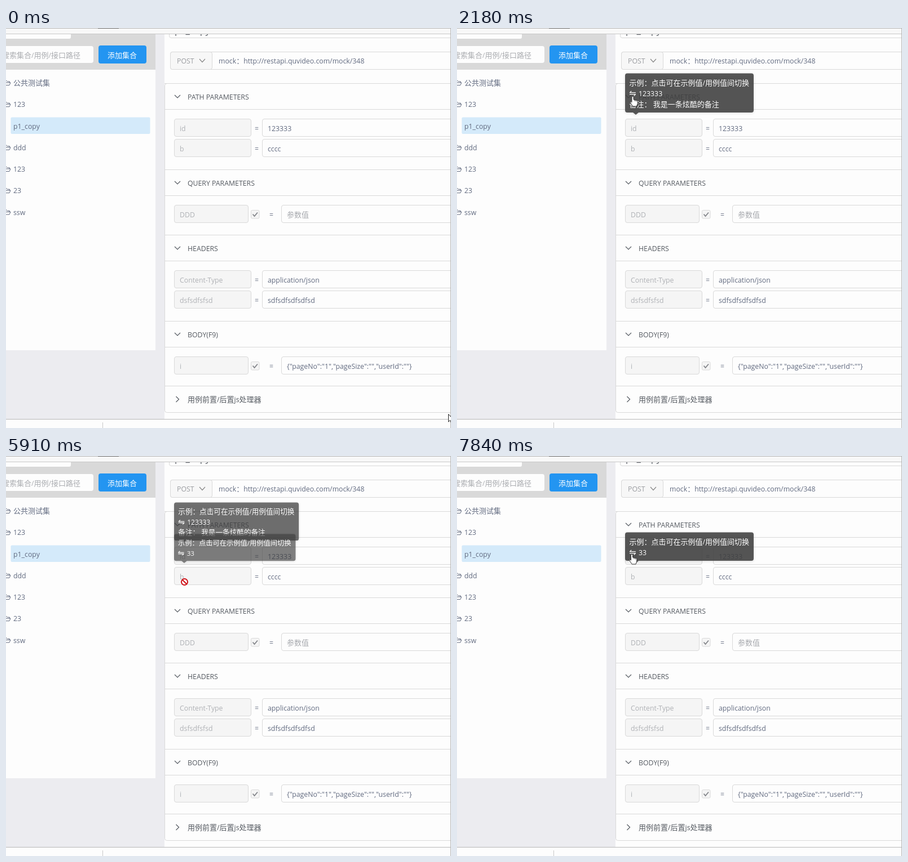
Recreate the animation shown at these times as an HTML page. Size 789 by 710 pixels, loop 8 s.

```html
<!DOCTYPE html>
<html lang="zh-CN">
<head>
<meta charset="utf-8">
<title>API test case editor</title>
<style>
  html, body { margin: 0; width: 100%; height: 100%; overflow: hidden; background: #fdfdfd; }
  svg { display: block; }
  text { font: 12.3px "Open Sans", "Noto Sans", sans-serif; white-space: pre; }
  .cjk { font: 13px "Noto Sans CJK SC", "Noto Sans CJK", "DejaVu Sans", sans-serif; }
  .tip { filter: drop-shadow(0 1px 2px rgba(0, 0, 0, .15)); }
</style>
</head>
<body>
<svg id="stage" width="789" height="710" viewBox="0 0 789 710"></svg>
<script>
const LOOP = 8000;
const INK = '#626b80', HEAD = '#555a61', DIM = '#b0b2b6', LINE = '#d9d9d9', PAPER = '#fdfdfd';
const COLON = '\uff1a'; // full-width
const stage = document.getElementById('stage');

const rect = (x, y, w, h, fill, r = 0, stroke = 'none') =>
  `<rect x="${x}" y="${y}" width="${w}" height="${h}" rx="${r}" fill="${fill}" stroke="${stroke}"/>`;
const path = (d, stroke, width = 1, fill = 'none') =>
  `<path d="${d}" stroke="${stroke}" stroke-width="${width}" fill="${fill}"/>`;
const runs = s => s.replace(/[^\x00-\x7f]+/g, m => `<tspan class="cjk">${m}</tspan>`);
// y is the middle of the line of text
const text = (x, y, s, fill = INK, attrs = '') =>
  `<text x="${x}" y="${y + 4.6}" fill="${fill}" ${attrs}>${runs(s)}</text>`;
const box = (x, y, w, fill = PAPER, h = 31) => rect(x + .5, y + .5, w, h, fill, 3.5, LINE);

function sidebar() {
  let out = rect(0, 10, 281, 684, '#ececf0') + rect(0, 10, 265, 64, LINE) +
    rect(-5, 5, 120, 14, PAPER, 3) + rect(0, 74, 265, 498, PAPER) +
    rect(-5, 32, 160, 30, PAPER, 4) + text(-7, 48, '搜索集合/用例/接口路径', '#aaacb0') +
    rect(164, 31, 85, 32, '#2395f1', 4) + text(180, 48, '添加集合', '#fff') +
    rect(8.5, 158.5, 247, 29.5, '#d4eafa', 2);
  ['公共测试集', '123', 'p1_copy', 'ddd', '123', '23', 'ssw'].forEach((name, i) => {
    const y = 97.5 + i * 38.25;
    out += text(13, y, name);
    if (i !== 2)
      out += path(`M-3 ${y + 4}v-8h4l1.5 1.5h4v2M-3 ${y + 4}l2-4.5h9l-2 4.5z`, INK);
  });
  return out;
}

function section(y, title, open = true) {
  const arrow = open ? `M299 ${y + 21}l5 5 5-5` : `M301.5 ${y + 19}l5 5-5 5`;
  const foot = open ? path(`M281 ${y + 46.5}H789`, LINE) : '';
  return path(`M281 ${y + .5}H789`, LINE) + foot + path(arrow, HEAD, 1.2) + text(322, y + 24, title, HEAD);
}

function field(y, name, value, check = false, color = INK, id = '') {
  const x = check ? 488 : 454;
  let out = box(298, y, check ? 131 : 136, '#f5f5f5') + text(308, y + 17, name, DIM) +
    text(check ? 467 : 441, y + 17, '=') + box(x, y, 400) +
    text(x + 10, y + 17, value, color, id && `id="${id}"`);
  if (check)
    out += rect(434.5, y + 9.5, 14.5, 14.5, '#f5f5f5', 2, LINE) +
      path(`M437.5 ${y + 16.5}l3 3.5 5.5-6.5`, '#85878c', 1.8);
  return out;
}

function editor() {
  return rect(281, 10, 508, 684, PAPER) +
    `<svg x="0" y="11" width="789" height="30" viewBox="0 11 789 30">${box(289, -14, 560) +
      text(299, 5.5, 'p1_copy', HEAD, 'style="font-size:16.5px"')}</svg>` +
    box(291, 42, 600) + box(291, 42, 74, '#f7f7f7') +
    text(303, 58.5, 'POST', '#9a9ca0') + path('M343 55l5 5.5 5-5.5', '#888', 1.2) +
    text(377, 58.5, `mock${COLON}http://restapi.quvideo.com/mock/348`) +
    rect(281.5, 98.5, 600, 584, PAPER, 4, LINE) +
    section(98, 'PATH PARAMETERS') +
    field(161, 'id', '123333', false, INK, 'idValue') + field(197, 'b', 'cccc', false, INK, 'bValue') +
    section(251, 'QUERY PARAMETERS') + field(314, 'DDD', '参数值', true, '#a6a8ad') +
    section(367, 'HEADERS') + field(430, 'Content-Type', 'application/json') +
    field(466, 'dsfsdfsfsd', 'sdfsdfsdfsdfsd') +
    section(520, 'BODY(F9)') + field(583, 'i', '{"pageNo":"1","pageSize":"","userId":""}', true) +
    section(635, '用例前置/后置js处理器', false);
}

const chrome = () =>
  rect(0, 0, 789, 10, '#f8f8f8') + path('M0 .5H789', '#b5b5b5') + path('M163 .5H200', '#666') +
  path('M0 10.5H789', '#c8c8c8') + rect(0, 694, 789, 16, PAPER) +
  path('M0 694.5H789', '#b8b8b8') + path('M171.5 700V710', '#c8c8c8') + path('M788.5 0V710', '#b5b5b5');

// Tooltip drawn upwards from its lower left corner, arrow included
function tooltip(id, y, lines) {
  const h = 12 + lines.length * 19.2, top = -4 - h;
  const rows = lines.map((s, i) => {
    const mid = top + 16.5 + i * 19;
    return i === 1
      ? `<text x="7" y="${mid + 5}" fill="#fff" style="font:15px 'DejaVu Sans',sans-serif">⇋</text>` + text(24, mid, s, '#fff')
      : text(7.5, mid, s, '#fff');
  }).join('');
  return `<g id="${id}" class="tip" data-y="${y}">` +
    path(`M4 ${top}H224q4 0 4 4V-8q0 4-4 4H24l-5 4-5-4H4q-4 0-4-4V${top + 4}q0-4 4-4z`, 'none', 0, 'rgba(64,64,64,.87)') +
    rows + '</g>';
}

const cursors = {
  arrow: path('M.5.5V14l3-2.8 2.2 5 2-.9-2.2-4.8H10z', '#222', 1, '#fff'),
  beam: path('M-3-7.5h2.3q.7 0 .7.7V7q0 .6-.7.6H-3M3-7.5H.7Q0-7.5 0-6.8V7q0 .6.7.6H3', '#eee'),
  ban: '<circle r="5.5" fill="#fff" stroke="#cf1017" stroke-width="2"/>' + path('M-4-4L4 4', '#cf1017', 2),
  hand: path('M-1.6 11V1.3Q0-.8 1.6 1.3V6l5.8 1.3Q8.8 7.7 8.8 9.5V13l-1.8 5H.2l-4.6-7q-.2-2.6 2.8 0z' +
    'M4 6.8V9M6.5 7.4V9.5', '#222', .9, '#fff')
};

const moves = [
  [0, 'arrow', 784, 685], [650, 'arrow', 652, 361], [790, 'arrow', 565, 306], [910, 'arrow', 458, 238],
  [1030, 'ban', 395.5, 203.5], [1180, 'ban', 320.5, 178.5], [1330, 'ban', 314.5, 178.5],
  [1480, 'ban', 323.5, 185.5], [1750, 'ban', 321, 166], [1880, 'beam', 318, 134],
  [2030, 'beam', 318, 131.5], [2180, 'hand', 311.5, 121], [5460, 'beam', 316, 139.5],
  [5610, 'ban', 316.5, 176.5], [5760, 'ban', 316.5, 203.5], [5910, 'ban', 316.5, 223.5],
  [6340, 'ban', 316.5, 219.5], [6490, 'ban', 316.5, 211], [6620, 'ban', 317.5, 201.5],
  [6770, 'beam', 315.5, 190], [6910, 'hand', 310, 174]
];
// [start, scale, opacity]
const tipA = [[0, 1, 0], [1330, .995, .97], [1480, 1, 1], [5910, .97, .85], [6060, 1, 0]];
const tipB = [[0, 1, 0], [5910, .945, .75], [6060, 1, 1]];
const idValues = [[0, 1], [3080, 0], [3920, 1], [4500, 0], [5210, 1]];
const bValues = [[0, 'cccc'], [7310, '33'], [7840, 'cccc']];
const at = (steps, t) => steps.filter(s => s[0] <= t).pop();

const hint = `示例${COLON}点击可在示例值/用例值间切换`;
stage.innerHTML = sidebar() + editor() + chrome() +
  tooltip('tipA', 154, [hint, '123333', `备注${COLON} 我是一条炫酷的备注`]) +
  tooltip('tipB', 190, [hint, '33']) +
  Object.keys(cursors).map(k => `<g id="${k}">${cursors[k]}</g>`).join('');
const el = id => document.getElementById(id);

function pose(id, [, scale, opacity]) {
  const tip = el(id);
  tip.setAttribute('transform', `translate(298 ${tip.dataset.y}) scale(${scale})`);
  tip.setAttribute('opacity', opacity);
}

function setValue(id, s, color) {
  const node = el(id);
  if (node.textContent !== s) node.innerHTML = runs(s);
  node.setAttribute('fill', color);
}

function frame() {
  const t = performance.now() % LOOP;
  const [, kind, x, y] = at(moves, t);
  for (const k in cursors) {
    el(k).setAttribute('visibility', k === kind ? 'visible' : 'hidden');
    el(k).setAttribute('transform', `translate(${x} ${y})`);
  }
  pose('tipA', at(tipA, t));
  pose('tipB', at(tipB, t));
  const filled = at(idValues, t)[1];
  setValue('idValue', filled ? '123333' : '参数值', filled ? INK : '#a6a8ad');
  setValue('bValue', at(bValues, t)[1], INK);
  requestAnimationFrame(frame);
}
frame();
</script>
</body>
</html>
```
